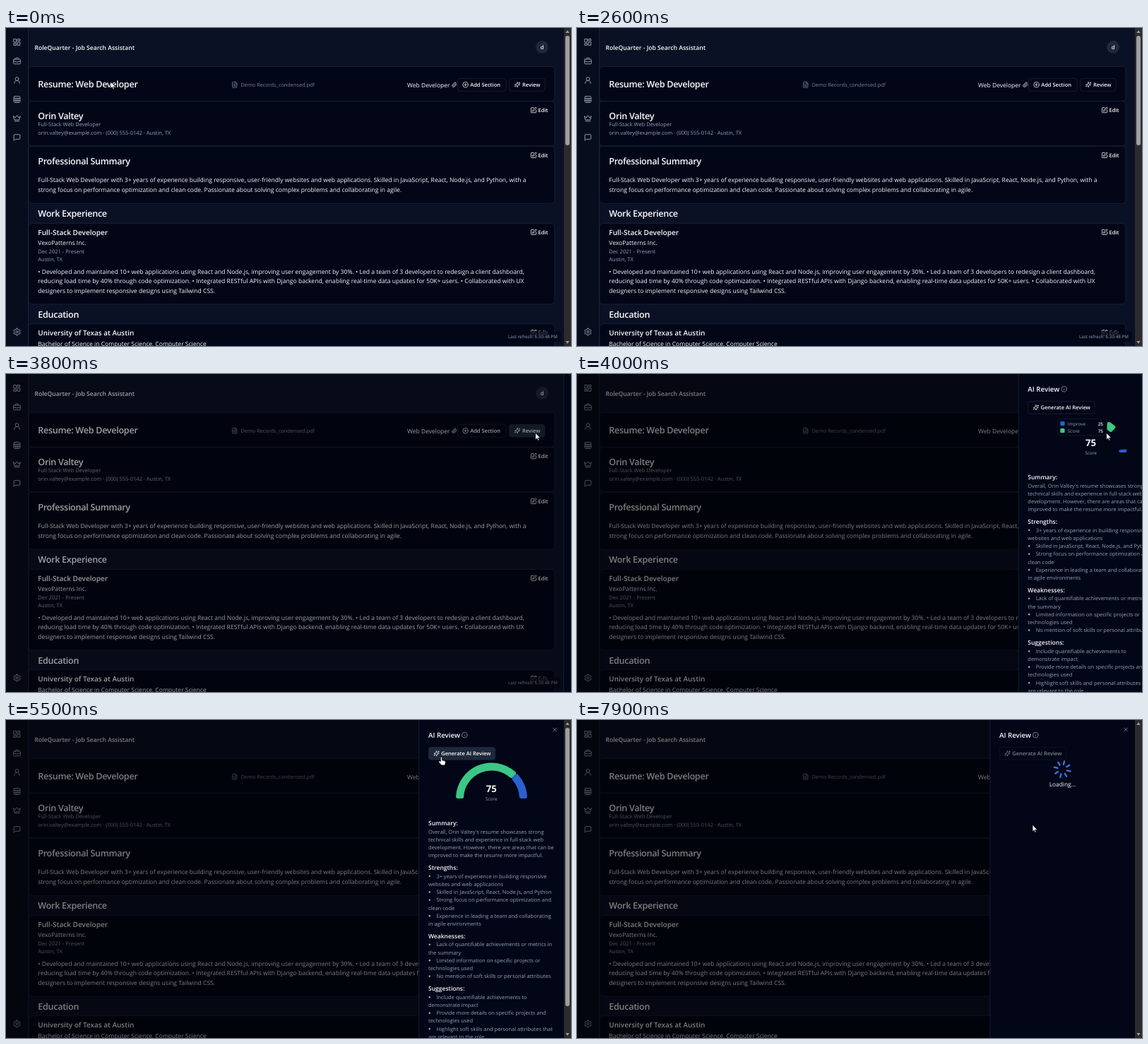
Animation, 800 px wide and 450 px high, one loop 8000 ms. Source, as an HTML page:

```html
<!DOCTYPE html>
<html lang="en">
<head>
<meta charset="utf-8">
<title>Resume review</title>
<style>
  html, body { margin: 0; width: 100%; height: 100%; overflow: hidden; background: #020617; }
  svg { display: block; }
  text { font-family: "Open Sans", "Noto Sans", sans-serif; text-rendering: geometricPrecision; white-space: pre; }
  .title { letter-spacing: -.025em; }
</style>
</head>
<body>
<svg id="stage" width="800" height="450" viewBox="0 0 800 450"></svg>
<script>
const LOOP = 8000;
const WHITE = '#f8fafc', MUTED = '#94a3b8', FAINT = '#77839a', LINE = '#1e293b', CARD = '#020617', PAGE = '#0b1124';
const GREEN = '#3bc785', BLUE = '#2a60d0';

const gear = 'M' + Array.from({length: 72}, (_, i) => {
  const a = i * Math.PI / 36;
  const r = 8.8 + 1.4 * Math.max(-1, Math.min(1, 2 * Math.cos(6 * a)));
  return (12 + r * Math.sin(a)).toFixed(2) + ' ' + (12 - r * Math.cos(a)).toFixed(2);
}).join('L') + 'ZM15 12a3 3 0 1 1-6 0a3 3 0 1 1 6 0';

// Outline icons on a 24 unit grid
const ICONS = {
  dashboard: 'M3 3h7v9H3zM14 3h7v5h-7zM14 12h7v9h-7zM3 16h7v5H3z',
  briefcase: 'M4 6h16a2 2 0 0 1 2 2v10a2 2 0 0 1-2 2H4a2 2 0 0 1-2-2V8a2 2 0 0 1 2-2zM8 6V4a2 2 0 0 1 2-2h4a2 2 0 0 1 2 2v2M2 12q10 5 20 0',
  user: 'M17 8a5 5 0 1 1-10 0a5 5 0 1 1 10 0M20 21a8 8 0 0 0-16 0',
  table: 'M5 3h14a2 2 0 0 1 2 2v14a2 2 0 0 1-2 2H5a2 2 0 0 1-2-2V5a2 2 0 0 1 2-2zM3 9h18M3 15h18M9 9v12M15 9v12',
  crown: 'M2 5l5 5 5-7 5 7 5-5-3 11H5zM5 20h14',
  message: 'M21 15a2 2 0 0 1-2 2H7l-4 4V5a2 2 0 0 1 2-2h14a2 2 0 0 1 2 2z',
  gear,
  file: 'M15 2H6a2 2 0 0 0-2 2v16a2 2 0 0 0 2 2h12a2 2 0 0 0 2-2V7zM14 2v6h6M16 13H8M16 17H8M10 9H8',
  clip: 'M21.4 11l-9.2 9.2a6 6 0 0 1-8.5-8.5l8.6-8.6a4 4 0 1 1 5.7 5.7l-8.6 8.5a2 2 0 0 1-2.8-2.8l8.5-8.5',
  plus: 'M22 12a10 10 0 1 1-20 0a10 10 0 1 1 20 0M8 12h8M12 8v8',
  info: 'M22 12a10 10 0 1 1-20 0a10 10 0 1 1 20 0M12 16v-4M12 8v.1',
  pen: 'M12 3H5a2 2 0 0 0-2 2v14a2 2 0 0 0 2 2h14a2 2 0 0 0 2-2v-7M18.4 2.6a2 2 0 0 1 3 3L12 15l-4 1 1-4z',
  sparkles: 'M12 2.5l-2 6.1a2 2 0 0 1-1.4 1.4L2.5 12l6.1 2a2 2 0 0 1 1.4 1.4l2 6.1 2-6.1a2 2 0 0 1 1.4-1.4l6.1-2-6.1-2a2 2 0 0 1-1.4-1.4zM20 3v4M22 5h-4M4 17v2M5 18H3',
  close: 'M18 6L6 18M6 6l12 12',
  loader: 'M12 2v4M16.2 7.8l2.9-2.9M18 12h4M16.2 16.2l2.9 2.9M12 18v4M4.9 19.1l2.9-2.9M2 12h4M4.9 4.9l2.9 2.9'
};

const text = (x, y, size, str, fill = WHITE, weight = 400, extra = '') =>
  `<text x="${x}" y="${y}" font-size="${size}" fill="${fill}" font-weight="${weight}" ${extra}>${str}</text>`;
const title = (y, str) => text(45.3, y, 12.63, str, WHITE, 600, 'class="title"');
const rect = (x, y, w, h, fill, r = 0, extra = '') =>
  `<rect x="${x}" y="${y}" width="${w}" height="${h}" rx="${r}" fill="${fill}" ${extra}/>`;
const icon = (name, cx, cy, size, color = WHITE) =>
  `<path d="${ICONS[name]}" transform="translate(${cx - size / 2} ${cy - size / 2}) scale(${size / 24})"
    fill="none" stroke="${color}" stroke-width="2" stroke-linecap="round" stroke-linejoin="round"/>`;
const card = (y, h) => rect(32, y, 744.8, h, CARD, 5, `stroke="${LINE}" stroke-width=".7"`);
const button = (x, y, w, h, id = '') => rect(x, y, w, h, CARD, 3.5, `stroke="${LINE}" stroke-width=".7" ${id}`);
const edit = y => icon('pen', 747, y, 9.5) + text(753.6, y + 2.8, 7.5, 'Edit', WHITE, 600);
const lines = (x, y, step, size, color, list) =>
  list.map((s, i) => text(x, y + i * step, size, s, color)).join('');
const scrollbar = (thumb, id = '') => rect(790, 0, 10, 450, '#2b2b2b') +
  `<path d="M792.3 7h5.4L795 3.2zM792.3 443h5.4L795 446.8z" fill="#9f9f9f"/>` +
  rect(792, 11, 6, thumb, '#9f9f9f', 3, id);

const sidebar = rect(0, 0, 31, 450, '#080d1d') + rect(31, 0, .8, 450, LINE) +
  ['dashboard', 'briefcase', 'user', 'table', 'crown', 'message']
    .map((n, i) => icon(n, 15.5, 20 + 27 * i, 11.5, MUTED)).join('') +
  icon('gear', 15.5, 430, 11.5, MUTED);

const page = rect(0, 0, 800, 450, PAGE) + sidebar +
  text(40.4, 31, 8.6, 'RoleQuarter - Job Search Assistant', WHITE, 600) +
  `<circle cx="759" cy="27" r="9" fill="${LINE}"/>` +
  text(759, 30, 7.6, 'd', WHITE, 600, 'text-anchor="middle"') +

  card(54.4, 49) + title(83.6, 'Resume: Web Developer') +
  icon('file', 323.7, 80.3, 9.5, FAINT) + text(332.5, 83, 7.35, 'Demo Records_condensed.pdf', FAINT) +
  text(568, 83.5, 8.53, 'Web Developer') + icon('clip', 635, 80.3, 8) +
  button(639.5, 71.3, 68.5, 18) + icon('plus', 650.5, 80.3, 9) + text(657.2, 83, 7.5, 'Add Section', WHITE, 600) +
  button(712.5, 71.3, 50.5, 18, 'id="review"') + icon('sparkles', 724, 80.3, 9) + text(731, 83, 7.5, 'Review', WHITE, 600) +

  card(103.6, 63.2) + title(129.2, 'Orin Valtey') + edit(116.2) +
  text(45.3, 139.2, 7.55, 'Full-Stack Web Developer', MUTED) +
  text(45.3, 150.5, 7.5, 'orin.valtey@example.com · (000) 555-0142 · Austin, TX', MUTED) +

  card(167.2, 81.2) + title(192.6, 'Professional Summary') + edit(180) +
  lines(45.3, 218.2, 13.5, 8.57, WHITE, [
    'Full-Stack Web Developer with 3+ years of experience building responsive, user-friendly websites and web applications. Skilled in JavaScript, React, Node.js, and Python, with a',
    'strong focus on performance optimization and clean code. Passionate about solving complex problems and collaborating in agile.']) +

  title(267.4, 'Work Experience') + card(276.4, 114.4) + edit(288.8) +
  text(45.3, 292.6, 10.07, 'Full-Stack Developer', WHITE, 600) +
  text(45.3, 307, 8.53, 'VexoPatterns Inc.') +
  lines(45.3, 318.7, 11.5, 7.55, MUTED, ['Dec 2021 - Present', 'Austin, TX']) +
  lines(45.3, 347.5, 13.5, 8.59, WHITE, [
    '• Developed and maintained 10+ web applications using React and Node.js, improving user engagement by 30%. • Led a team of 3 developers to redesign a client dashboard,',
    'reducing load time by 40% through code optimization. • Integrated RESTful APIs with Django backend, enabling real-time data updates for 50K+ users. • Collaborated with UX',
    'designers to implement responsive designs using Tailwind CSS.']) +

  title(410.2, 'Education') + card(418.6, 60) + edit(431.2) +
  text(45.3, 435.4, 9.97, 'University of Texas at Austin', WHITE, 600) +
  text(45.3, 449.6, 8.55, 'Bachelor of Science in Computer Science, Computer Science') +
  rect(706.5, 429, 79, 15, CARD, 3, 'opacity=".75"') +
  text(711, 439, 6.25, 'Last refresh: 6:30:48 PM', MUTED) +
  scrollbar(155);

// Rows starting with "-" open a bullet
const section = (y, head, rows) => text(598, y, 8.5, head, WHITE, 600) + rows.map((row, i) => {
  const ly = y + 11.8 + 11.23 * i, bullet = row[0] === '-';
  return (bullet ? `<circle cx="599.8" cy="${ly - 2.6}" r="1.3" fill="${MUTED}"/>` : '') +
    text(bullet ? 609.4 : 598, ly, 7.48, bullet ? row.slice(1) : row, MUTED);
}).join('');

const legendRow = (y, color, name, value) => rect(644, y - 5.6, 6.2, 6.2, color, 1) +
  text(654.5, y, 6.5, name, MUTED) + text(704.5, y, 6.2, value, WHITE, 600, 'text-anchor="end"');

const result = `<g id="result">
  <path id="score" fill="${GREEN}" stroke="${GREEN}" stroke-linejoin="round"/>
  <path id="rest" fill="${BLUE}" stroke="${BLUE}" stroke-linejoin="round"/>` +
  text(687.3, 102.3, 13.2, '75', WHITE, 700, 'text-anchor="middle"') +
  text(687.3, 113.8, 6.5, 'Score', MUTED, 400, 'text-anchor="middle"') +
  `<g id="tip">` + rect(640, 63.5, 70, 23.5, CARD, 3, `stroke="${LINE}" stroke-width=".5"`) +
  legendRow(72.6, BLUE, 'Improve', '25') + legendRow(82.6, GREEN, 'Score', '75') + `</g>` +
  section(148.8, 'Summary:', [
    'Overall, Orin Valtey\'s resume showcases strong', 'technical skills and experience in full-stack web',
    'development. However, there are areas that can be', 'improved to make the resume more impactful.']) +
  section(211.8, 'Strengths:', [
    '-3+ years of experience in building responsive', 'websites and web applications',
    '-Skilled in JavaScript, React, Node.js, and Python',
    '-Strong focus on performance optimization and', 'clean code',
    '-Experience in leading a team and collaborating', 'in agile environments']) +
  section(308.5, 'Weaknesses:', [
    '-Lack of quantifiable achievements or metrics in', 'the summary',
    '-Limited information on specific projects or', 'technologies used',
    '-No mention of soft skills or personal attributes']) +
  section(383, 'Suggestions:', [
    '-Include quantifiable achievements to', 'demonstrate impact',
    '-Provide more details on specific projects and', 'technologies used',
    '-Highlight soft skills and personal attributes that', 'are relevant to the role']) + `</g>`;

const panel = rect(584.5, 0, 216, 450, CARD) + rect(584.5, 0, .7, 450, LINE) +
  text(598, 25, 9.75, 'AI Review', WHITE, 600) + icon('info', 649.3, 21.3, 9.2, MUTED) +
  icon('close', 777, 13.6, 9, MUTED) +
  `<g id="generate">` + button(598.3, 38.6, 94.5, 17.7, 'id="face"') + icon('sparkles', 609.5, 47.5, 9) +
  text(616.2, 50.3, 7.52, 'Generate AI Review', WHITE, 600) + `</g>` + result +
  `<g id="loading"><g id="spinner">` + icon('loader', 0, 0, 28, '#3b78e0') + `</g>` +
  text(687.5, 93.6, 8.4, 'Loading...', WHITE, 400, 'text-anchor="middle"') + `</g>` +
  scrollbar(394, 'id="thumb"');

const $ = id => document.getElementById(id);
const show = (id, on) => $(id).setAttribute('display', on ? 'inline' : 'none');

$('stage').innerHTML = page + rect(0, 0, 800, 450, '#000', 0, 'id="dim"') +
  `<g id="panel">${panel}</g>
  <g id="cursor" fill="#fff" stroke="#000" stroke-width=".7" stroke-linejoin="round">
    <path id="arrow" d="M0 0V9.6L2.2 7.6 3.7 11 5.2 10.3 3.7 7.1H6.8Z"/>
    <path id="hand" d="M-1 1a1.1 1.1 0 0 1 2.2 0v3.4l3.6.8q1.4.4 1.2 1.8l-.5 3.3q-.2 1.2-1.3 1.2H1q-.8 0-1.4-.8L-3.6 7q-.5-.9.3-1.3t1.5.2l.8.6Z"/>
  </g>`;

function bezier(x1, y1, x2, y2) {
  const at = (a, b, s) => 3 * a * s * (1 - s) ** 2 + 3 * b * s * s * (1 - s) + s ** 3;
  return x => {
    if (x <= 0) return 0;
    if (x >= 1) return 1;
    let lo = 0, hi = 1;
    for (let i = 0; i < 24; i++) {
      const mid = (lo + hi) / 2;
      if (at(x1, x2, mid) < x) lo = mid; else hi = mid;
    }
    return at(y1, y2, lo);
  };
}
const slide = bezier(.4, 0, .2, 1), ease = bezier(.25, .1, .25, 1);

// Ring piece with rounded corners, angles in degrees counter-clockwise
function sector(id, from, to) {
  const rad = Math.PI / 180, span = (to - from) * rad;
  const c = Math.min(2.8, span * 39.5 / 2 * .95), r = 39.5 + c, R = 50.5 - c;
  const point = (q, a) => `${687.5 + q * Math.cos(a)} ${111 - q * Math.sin(a)}`;
  const start = q => from * rad + Math.asin(c / q), end = q => to * rad - Math.asin(c / q);
  $(id).setAttribute('d', `M${point(r, start(r))}L${point(R, start(R))}A${R} ${R} 0 0 0 ${point(R, end(R))}` +
    `L${point(r, end(r))}A${r} ${r} 0 0 1 ${point(r, start(r))}Z`);
  $(id).setAttribute('stroke-width', 2 * c);
}

// Pointer stops: time, x, y
const STOPS = [[0, 148, 76], [600, 148, 76], [2300, 806, 340], [2900, 806, 340], [3600, 749.7, 83.3],
  [4400, 749.7, 83.3], [5300, 616.3, 52.5], [5950, 616.3, 52.5], [6400, 645, 148.3], [LOOP, 645, 148.3]];
function pointer(t) {
  const i = STOPS.findIndex(s => s[0] > t), [t0, x0, y0] = STOPS[i - 1], [t1, x1, y1] = STOPS[i];
  const p = slide((t - t0) / (t1 - t0));
  return [x0 + (x1 - x0) * p, y0 + (y1 - y0) * p];
}

function draw(t) {
  const loading = t >= 5900, [x, y] = pointer(t);
  const over = !loading && t > 4300 && x < 693 && y < 56.5;

  $('review').setAttribute('fill', t > 3550 ? LINE : CARD);
  $('dim').setAttribute('opacity', .5 * ease((t - 3735) / 150));
  $('panel').setAttribute('transform', `translate(${215.5 * (1 - slide((t - 3735) / 500))})`);
  show('panel', t > 3735);

  const grow = Math.max(.002, ease((t - 3830) / 1500));
  sector('rest', 0, 45 * grow);
  sector('score', 45, 45 + 135 * grow);
  show('tip', t >= 3900 && t < 4350);

  show('result', !loading);
  show('thumb', !loading);
  show('loading', loading);
  $('spinner').setAttribute('transform', `translate(687.2 69.7) rotate(${5 + (t - 6500) * .36})`);
  $('generate').setAttribute('opacity', loading ? .5 : 1);
  $('face').setAttribute('fill', over ? LINE : CARD);

  $('cursor').setAttribute('transform', `translate(${x} ${y})`);
  show('arrow', !over);
  show('hand', over);
}

const begin = performance.now();
function tick() {
  draw((performance.now() - begin) % LOOP);
  requestAnimationFrame(tick);
}
tick();
</script>
</body>
</html>
```
